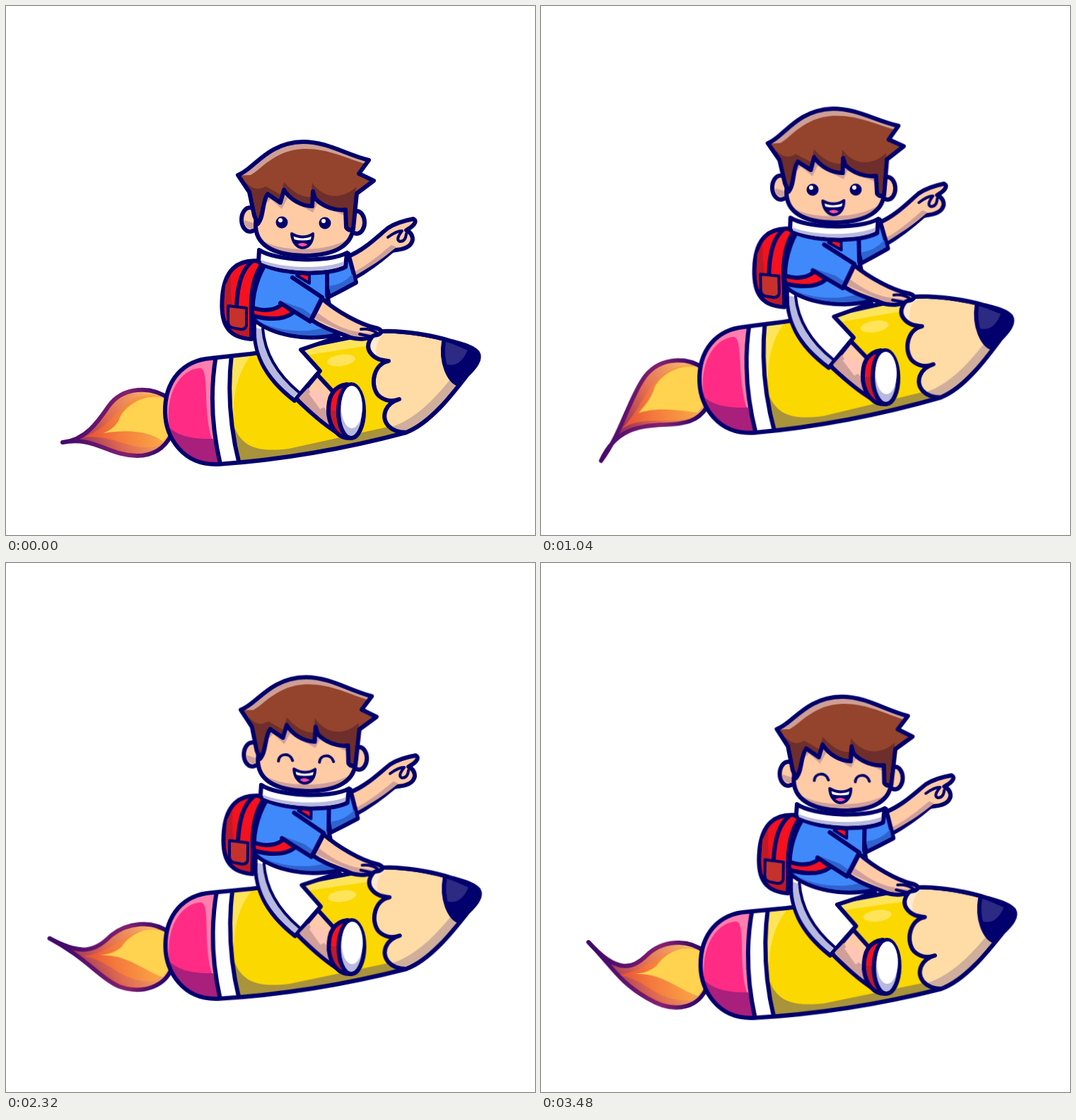
Animation, 748 px wide and 748 px high, one loop 3520 ms. Source, as an HTML page without scripts:

```html
<!DOCTYPE html>
<html lang="en">
<head>
<meta charset="utf-8">
<title>Pencil rocket</title>
<style>
html, body { margin: 0; width: 100%; height: 100%; overflow: hidden; background: #fff; }
svg { display: block; width: 100vw; height: 100vh; }

.line { stroke: #02006c; stroke-width: 6; stroke-linejoin: round; stroke-linecap: round; }
.thin { stroke-width: 4; }
.none { fill: none; }
.skin { fill: #ffcba5; }
.skin-shade { fill: #cfa09a; }
.blue { fill: #4089fb; }
.blue-shade { fill: #2f63cf; }
.red { fill: #f5111d; }
.red-shade { fill: #bd1a27; }
.white { fill: #fff; }
.gray { fill: #b7b9de; }
.navy { fill: #02006c; }

.bounce, .tilt, .eyes, .flame path {
  animation: 880ms infinite cubic-bezier(.37, 0, .63, 1);
}
.bounce { animation-name: bounce; }
.tilt { animation-name: tilt; transform-origin: 448px 620px; }
.eyes { animation-name: blink; animation-timing-function: step-end; }
.eyes.happy { animation-delay: -440ms; }
.flame .outer { animation-name: outer; }
.flame .middle { animation-name: middle; }
.flame .core { animation-name: core; }

@keyframes bounce {
  0%, 46.6%, 100% { transform: translateY(0); }
  22.73% { transform: translateY(-52px); }
  72.73% { transform: translateY(-41px); }
}
@keyframes tilt {
  0%, 100% { transform: rotate(0deg); }
  22.73% { transform: rotate(-1.2deg); }
  45.45% { transform: rotate(.9deg); }
  63.64% { transform: rotate(.6deg); }
  72.73% { transform: rotate(0deg); }
  95.45% { transform: rotate(.82deg); }
}
@keyframes blink {
  0% { opacity: 1; }
  50%, 100% { opacity: 0; }
}
@keyframes outer {
  0%, 72.73%, 100% { d: path("M232 556C205 536 165 538 145 566C130 588 112 614 80 617C125 608 145 636 185 636C212 636 226 622 234 606Z"); }
  22.73% { d: path("M232 556C205 536 165 540 145 570C122 604 112 650 84 690C104 640 140 636 168 634C205 634 222 630 234 612Z"); }
  43% { d: path("M232 556C205 536 165 540 145 566C120 596 85 606 36 622C100 606 130 636 180 636C212 636 226 622 234 606Z"); }
  63.64% { d: path("M232 556C205 536 170 542 148 560C126 582 108 590 61 565C110 590 135 622 160 632C195 644 225 630 234 606Z"); }
  95.45% { d: path("M232 556C205 536 170 540 148 562C130 580 108 590 66 544C100 578 110 600 150 622C195 648 225 630 234 606Z"); }
}
@keyframes middle {
  0%, 72.73%, 100% { d: path("M215 550C160 545 165 588 110 610C150 604 180 632 215 622L232 600Z"); }
  22.73% { d: path("M215 550C155 552 150 604 114 642C142 620 185 636 217 624L232 600Z"); }
  43% { d: path("M215 550C160 545 155 592 98 609C150 604 180 632 215 622L232 600Z"); }
  63.64%, 95.45% { d: path("M215 550C165 550 160 582 108 590C150 594 160 628 212 624L232 600Z"); }
}
@keyframes core {
  0%, 72.73%, 100% { d: path("M232 560C205 540 165 565 160 585C155 594 149 599 138 604C175 598 205 602 222 616L234 600Z"); }
  22.73% { d: path("M232 560C205 540 165 565 160 585C154 600 146 608 138 618C170 608 205 618 222 618L234 600Z"); }
  43% { d: path("M232 560C205 540 165 565 160 585C154 595 147 601 132 606C175 598 205 602 222 616L234 600Z"); }
  63.64%, 95.45% { d: path("M232 560C205 540 175 557 163 576C154 584 144 587 132 588C172 586 195 610 222 618L234 600Z"); }
}
</style>
</head>
<body>
<svg viewBox="0 0 748 748">
  <defs>
    <linearGradient id="fire" gradientUnits="userSpaceOnUse" x1="85" y1="630" x2="215" y2="560">
      <stop offset=".1" stop-color="#8c2a60"/>
      <stop offset=".5" stop-color="#e06a50"/>
      <stop offset="1" stop-color="#f8b76c"/>
    </linearGradient>
    <linearGradient id="ember" gradientUnits="userSpaceOnUse" x1="110" y1="610" x2="225" y2="590">
      <stop offset="0" stop-color="#e84b33"/>
      <stop offset=".4" stop-color="#f47a3c"/>
      <stop offset="1" stop-color="#fbac48"/>
    </linearGradient>
    <linearGradient id="edge" gradientUnits="userSpaceOnUse" x1="80" y1="0" x2="232" y2="0">
      <stop offset="0" stop-color="#43086b"/>
      <stop offset=".6" stop-color="#85206f"/>
      <stop offset="1" stop-color="#1c036c"/>
    </linearGradient>
    <path id="pencil" d="M530 460C560 458 605 466 630 474C648 479 660 482 667 490C673 500 662 512 652 522C632 548 600 590 566 603C480 626 385 642 300 648C250 650 226 610 225 575C224 530 250 501 290 498L345 492L420 482Z"/>
    <path id="wood" d="M530 460C515 464 508 480 515 490C522 500 532 501 541 502C520 506 514 535 526 550C534 558 545 560 556 556C536 562 530 580 540 593C548 602 560 603 566 603C600 590 632 548 652 522L668 490L630 474C605 466 560 458 530 460Z"/>
    <path id="face" d="M356 262C358 285 354 290 353 308C352 338 378 352 421 353C466 353 492 338 491 308C490 290 490 280 489 258L420 230Z"/>
    <path id="hair" d="M328 239C350 232 368 193 420 192C455 192 480 210 513 218L499 237L520 247L496 265L491 315Q485 319 481 313L480 288C466 290 448 284 437 272L434 262L433 283C418 283 402 274 393 260L388 278L370 266C362 276 365 298 356 308L351 296L344 263Z"/>
    <path id="mouth" d="M404 322C414 328 426 328 434 322C434 348 406 349 404 322Z"/>
    <clipPath id="in-pencil"><use href="#pencil"/></clipPath>
    <clipPath id="in-wood"><use href="#wood"/></clipPath>
    <clipPath id="in-face"><use href="#face"/></clipPath>
    <clipPath id="in-hair"><use href="#hair"/></clipPath>
    <clipPath id="in-mouth"><use href="#mouth"/></clipPath>
  </defs>

  <g class="bounce"><g class="tilt">
    <g class="flame">
      <path class="outer" fill="url(#fire)" d="M232 556C205 536 165 538 145 566C130 588 112 614 80 617C125 608 145 636 185 636C212 636 226 622 234 606Z"/>
      <path class="middle" fill="url(#ember)" d="M215 550C160 545 165 588 110 610C150 604 180 632 215 622L232 600Z"/>
      <path class="core" fill="#ffd24f" d="M232 560C205 540 165 565 160 585C155 594 149 599 138 604C175 598 205 602 222 616L234 600Z"/>
      <path class="outer none" stroke="url(#edge)" stroke-width="6" stroke-linejoin="round" d="M232 556C205 536 165 538 145 566C130 588 112 614 80 617C125 608 145 636 185 636C212 636 226 622 234 606Z"/>
    </g>

    <g id="rocket">
      <g clip-path="url(#in-pencil)">
        <use href="#pencil" fill="#fbd800"/>
        <path fill="#fde45a" d="M318 490H350C322 520 318 570 324 605L316 570Z"/>
        <path fill="#fde45a" d="M420 478L530 458L514 480L424 494Z"/>
        <path fill="#a9933b" d="M318 580C328 622 350 632 400 626L545 594L570 610L330 650Z"/>
        <ellipse cx="474" cy="501" rx="20" ry="8" fill="#ffe45a" transform="rotate(-8 474 501)"/>
        <path fill="#ff7fae" d="M215 490H300L290 570L308 655H215Z"/>
        <path fill="#ff2b84" d="M230 590C226 540 252 512 275 512C288 515 278 570 291 612L303 655H230Z"/>
        <path fill="#a91f7c" d="M222 586C240 612 270 612 293 612L308 655H222Z"/>
        <path class="white line" d="M297 494Q284 570 304 652L330 648Q310 570 319 492Z"/>
        <g clip-path="url(#in-wood)">
          <use href="#wood" fill="#ffdba5"/>
          <path fill="#ffebcf" d="M510 455H555C525 462 522 478 524 500L505 490Z"/>
          <path fill="#cfae9c" d="M535 598C580 588 610 550 635 520L660 520L580 610Z"/>
        </g>
        <path fill="#2d2a84" d="M619 470C612 502 624 530 642 538L680 510L668 480Z"/>
        <path class="navy" d="M655 480C646 508 632 510 621 506C625 524 633 532 642 538L685 500Z"/>
        <path class="line none" d="M619 474C614 504 626 530 640 535"/>
        <use href="#wood" class="line none"/>
      </g>
      <use href="#pencil" class="line none"/>
    </g>

    <g id="backpack">
      <path class="red line" d="M362 361C325 356 309 376 306 410C303 445 310 469 347 471L354 440L364 400Z"/>
      <path class="red-shade" d="M310 395C307 430 308 464 345 468L346 456C325 455 316 430 318 380Z"/>
      <path class="line none" d="M347 362C331 375 327 400 326 424M364 362C350 380 345 405 347 440V470"/>
      <path class="line thin" fill="#c6312c" d="M314 424L340 427V452Q338 458 331 457L320 455Q314 453 314 446Z"/>
    </g>

    <g id="far-arm">
      <path class="skin line" d="M484 354C508 344 525 326 540 314C552 306 565 303 576 301C583 305 575 312 566 317C576 322 578 332 570 339C560 347 550 343 545 347C530 360 515 372 492 385Z"/>
      <path class="skin-shade" d="M492 376C515 364 530 350 545 338L552 341C532 358 515 369 494 381Z"/>
      <path class="line thin none" d="M540 327Q552 318 560 318Q550 331 557 333Q565 333 566 322"/>
      <path class="blue line" d="M448 372L484 350L495 391Q475 402 457 411Z"/>
      <path class="blue-shade" d="M457 396Q476 394 490 379L492 389L459 407Z"/>
    </g>

    <g id="body">
      <path class="white line" d="M351 446C349 490 365 525 408 558L444 516L417 486L470 468Z"/>
      <path class="gray" d="M354 455C352 490 368 523 407 553L413 547C382 520 366 492 361 457Z"/>
      <path class="line thin none" d="M363 456C366 492 385 522 414 546"/>
      <path class="blue line" d="M366 366C352 390 345 422 351 444C378 466 425 474 466 465L454 408V360Z"/>
      <path class="blue-shade" d="M353 443C380 460 425 465 459 452L463 463C425 470 380 463 353 443Z"/>
      <path class="red line thin" d="M411 381L429 392V380L418 378Z"/>
      <path class="red line" d="M347 426C365 433 382 430 391 421L407 433C392 445 368 443 349 438Z"/>
      <path class="blue" d="M390 380L405 384L447 412L430 446L388 420Z"/>
      <path class="blue-shade" d="M389 417L420 428L434 438L430 444L402 430Z"/>
      <path class="line none" d="M405 384L447 412L430 446L388 420"/>
    </g>

    <g id="leg">
      <path class="skin line" d="M411 556L440 521L463 546L478 609Q450 594 411 556Z"/>
      <path class="skin-shade" d="M414 554L427 540Q440 565 465 578L472 602Q447 588 414 554Z"/>
      <path fill="#ffc5b6" d="M428 548Q442 536 450 552Q455 566 444 570Z"/>
      <path class="red line" d="M482 535C460 538 455 556 456 577C459 598 470 612 488 611Z"/>
      <path class="red-shade" d="M459 572C461 592 470 605 480 607L468 572Z"/>
      <ellipse class="gray line" cx="488" cy="573" rx="18" ry="38"/>
      <ellipse class="white" cx="489" cy="567" rx="15" ry="30"/>
    </g>

    <g id="near-arm">
      <path class="skin line" d="M447 414C468 432 500 450 522 455C537 459 530 465 519 466C514 471 500 472 488 469C465 460 448 455 432 444Z"/>
      <path class="skin-shade" d="M436 442L441 434C465 452 485 462 520 463C510 469 495 468 486 465Z"/>
      <path class="line thin none" d="M502 457Q515 456 524 462M500 464L514 467"/>
    </g>

    <g id="collar">
      <path class="white line" d="M358 345C380 360 455 364 482 349L480 369C455 382 385 380 357 362Z"/>
      <path class="gray" d="M361 359C390 371 450 373 478 361L477 367C452 378 388 376 361 363Z"/>
    </g>

    <g id="head">
      <ellipse class="skin line" cx="345" cy="302" rx="12" ry="17"/>
      <ellipse class="skin line" cx="496" cy="306" rx="11" ry="16"/>
      <path class="skin-shade" d="M337 303Q337 316 350 315V307Z"/>
      <g clip-path="url(#in-face)">
        <use href="#face" class="skin"/>
        <path class="skin-shade" d="M352 322C370 351 470 352 494 320V360H350Z"/>
        <path class="skin-shade" d="M363 284L374 273L390 287L398 272L434 292L440 280L480 297V260H365Z"/>
      </g>
      <use href="#face" class="line none"/>
      <use href="#hair" fill="#94442c"/>
      <g clip-path="url(#in-hair)">
        <path fill="#cf9f94" d="M325 240C350 228 370 190 420 188C460 190 480 208 516 217L510 224C480 215 455 201 420 202C380 204 362 230 346 239Z"/>
        <path fill="#6e2e2b" d="M340 250C352 262 360 259 367 255L389 267L393 249C408 265 418 270 431 270L433 250C445 268 470 278 495 256L492 322H478V292L434 290L392 268L388 285L368 270L358 312H348Z"/>
      </g>
      <use href="#hair" class="line none"/>
      <g class="eyes">
        <g id="eye"><circle class="navy" cx="390" cy="306" r="8.5"/><circle class="white" cx="388" cy="303" r="3"/></g>
        <use href="#eye" x="61" y="1"/>
      </g>
      <g class="eyes happy">
        <path id="lid" class="line thin none" d="M382 311C383 299 399 299 402 310"/>
        <use href="#lid" x="58" y="1"/>
      </g>
      <use href="#mouth" class="navy"/>
      <g clip-path="url(#in-mouth)">
        <path class="white" d="M404 320H435L432 330Q419 333 407 330Z"/>
        <ellipse cx="419" cy="341" rx="9" ry="6" fill="#ff4fa0"/>
      </g>
      <use href="#mouth" class="line thin none"/>
    </g>
  </g></g>
</svg>
</body>
</html>
```
